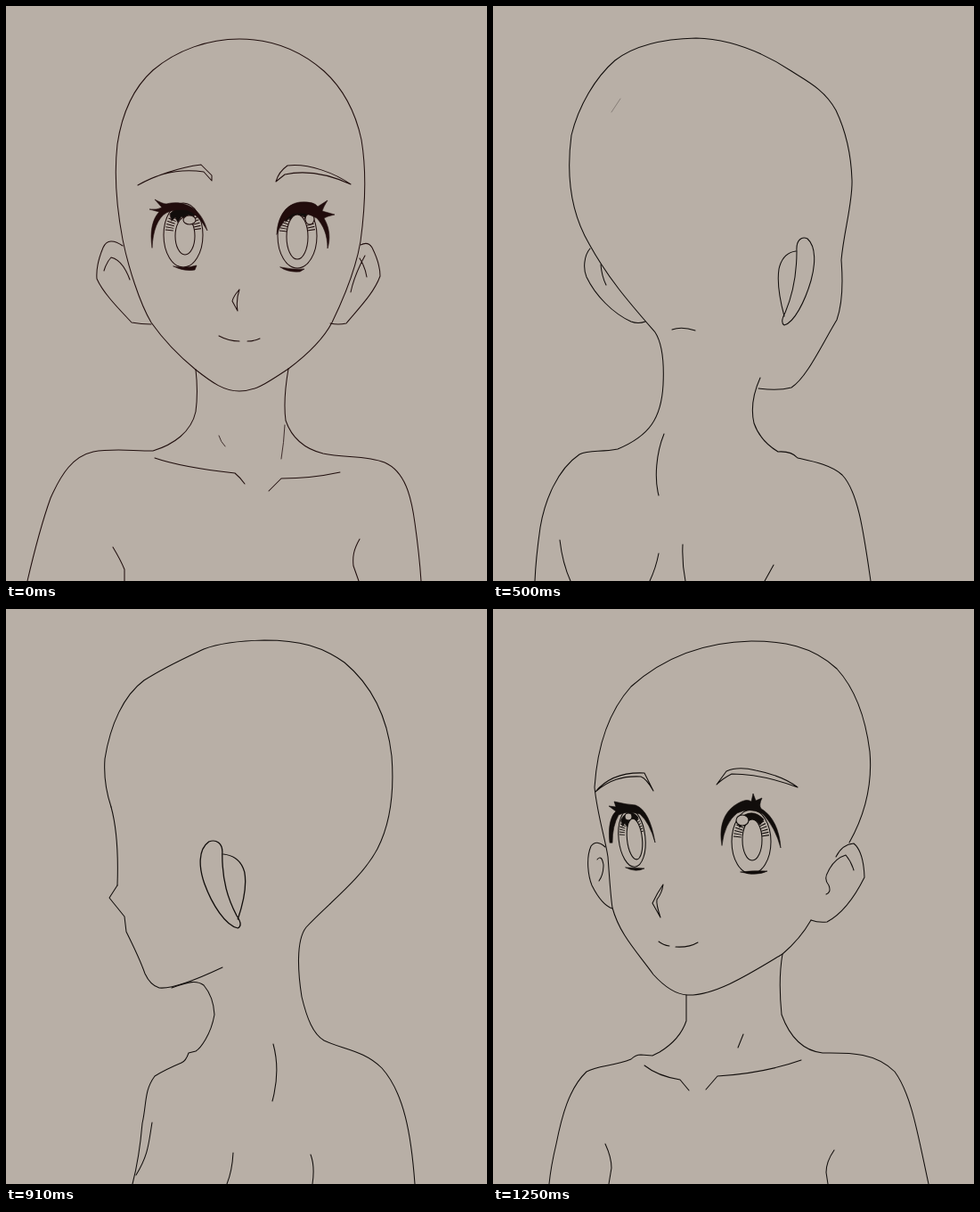
Animation of 540x645 px, one loop 1330 ms. Source, as an HTML page without scripts:

```html
<!DOCTYPE html>
<html lang="en">
<head>
<meta charset="utf-8">
<title>Head turnaround</title>
<style>
html,body{margin:0;height:100%;overflow:hidden;background:#b8afa6}
svg{display:block;width:100vw;height:100vh;overflow:hidden;fill:none;stroke:#110d0b;stroke-width:1.05;stroke-linecap:round;stroke-linejoin:round}
.warm{stroke:#210f0e}
.ink{fill:#110d0b;stroke-width:.6}
.warm .ink{fill:#210c0c}
.lit{fill:#b8afa6}
.faint{stroke-width:.6;opacity:.5}
.rim{vector-effect:non-scaling-stroke}
.hatch{stroke-width:9;stroke-dasharray:1 2;stroke-linecap:butt}
.strip{animation:turn 1330ms step-end infinite}
@keyframes turn{
0%{transform:translateX(0)}
6.01%{transform:translateX(-540px)}
12.03%{transform:translateX(-1080px)}
18.79%{transform:translateX(-1620px)}
24.81%{transform:translateX(-2160px)}
30.82%{transform:translateX(-2700px)}
37.59%{transform:translateX(-3240px)}
43.6%{transform:translateX(-3780px)}
49.62%{transform:translateX(-4320px)}
56.39%{transform:translateX(-4860px)}
62.4%{transform:translateX(-5400px)}
68.42%{transform:translateX(-5940px)}
75.18%{transform:translateX(-6480px)}
81.2%{transform:translateX(-7020px)}
87.21%{transform:translateX(-7560px)}
93.98%,100%{transform:translateX(-8100px)}
}
</style>
</head>
<body>
<svg viewBox="0 0 540 645" preserveAspectRatio="none">
<defs>
<g id="iris">
  <path class="hatch" d="M-15.7 -5A16 28 0 0 1 15.7 -5"/>
  <path class="ink" d="M-15 -24Q0 -40 14 -25L10 -19L6 -23L2 -16L-2 -21L-6 -14L-9 -20L-13 -16Z"/>
  <ellipse class="rim" rx="22" ry="36"/>
</g>

<!-- outline shared by the straight front and back views -->
<g id="outline">
  <path d="M213 408C191 390 175 372 163 355C150 333 137 292 131 262C124 225 121 190 125 155C131 115 145 90 165 72C192 49 228 37 262 37C300 37 332 51 357 73C380 94 393 122 399 150C404 180 404 220 398 264C394 288 382 322 366 355C354 378 333 395 317 407"/>
  <path d="M131 269C121 262 113 262 109 271C104 283 101 294 102 306C109 322 127 340 141 355Q152 357 163 357M398 268C404 265 408 266 411 271C416 281 420 292 420 303C413 322 397 338 382 356Q373 358 364 356"/>
  <path d="M213 408C215 425 215 440 213 455C208 478 188 492 165 499C140 499 120 496 98 500C75 505 62 525 50 552C40 580 31 615 24 645"/>
  <path d="M317 407C313 430 312 450 314 465C322 488 340 498 356 502C380 507 405 504 425 512C448 522 455 550 459 580Q464 615 466 645"/>
</g>

<g id="front" class="warm">
  <use href="#outline"/>
  <path d="M213 408C232 423 245 432 262 432C279 432 290 425 317 407"/>
  <path d="M110 297Q113 287 118 282Q131 285 139 307M387 321Q391 302 403 280M397 283Q403 292 405 304"/>
  <path d="M167 507C190 515 230 521 257 524Q263 529 268 536M295 544L309 530C330 530 352 528 375 523M120 607Q129 622 133 632V645M397 598C390 610 389 618 390 628L396 645"/>
  <path stroke-width=".8" d="M239 482Q241 489 246 494M313 470Q312 490 309 508"/>
  <path d="M148 201C168 190 195 181 219 178L231 190V196L222 186C195 182 170 188 148 201ZM303 197Q306 186 316 179C340 176 370 188 387 200C365 190 340 183 313 189Z"/>
  <path d="M262 318Q255 326 254 331L260 342Q258 330 262 318ZM239 370Q250 376 262 376M271 376Q279 376 285 373"/>
  <use href="#iris" transform="translate(199 257)"/>
  <ellipse class="lit" cx="201" cy="258" rx="11" ry="21"/>
  <ellipse class="lit" cx="206" cy="240" rx="7" ry="5"/>
  <use href="#iris" transform="translate(327 258)"/>
  <ellipse class="lit" cx="327" cy="259" rx="12" ry="25"/>
  <ellipse class="lit" cx="341" cy="239" rx="5" ry="6"/>
  <path class="ink" d="M164 271C161 252 165 238 172 231L161 228Q170 229 175 226L167 217Q176 222 180 222C200 217 219 226 226 252Q216 234 204 229Q190 227 180 232C170 238 165 252 164 271ZM188 292Q200 295 214 291L212 296Q200 298 188 292Z"/>
  <path class="ink" d="M304 256C305 235 315 222 330 220Q346 219 350 225L361 218Q356 226 355 230L369 234Q360 236 357 238C364 250 364 262 361 272C361 256 356 246 349 238Q335 230 322 233Q310 240 304 256ZM308 293Q322 296 335 295L330 298Q316 299 308 293Z"/>
</g>

<g id="back">
  <use href="#outline"/>
  <path d="M243 366Q262 359 282 366M118 284Q121 300 128 314M404 284Q402 302 394 318M262 492Q265 525 262 552M112 615Q114 632 121 645M232 616Q230 632 225 645M289 616L293 645M396 612Q394 632 388 645"/>
</g>

<g id="quarter">
  <path d="M109 268C90 236 84 200 86 165C89 120 110 82 137 61C165 42 200 36 230 36C280 38 325 62 363 86C383 103 393 127 399 158C405 190 405 210 399 232C394 255 390 280 391 292C393 315 391 335 386 352C372 376 360 402 343 423Q336 432 318 430C275 427 240 411 215 396Q185 376 170 350"/>
  <path d="M151 283C146 266 130 258 117 261C107 266 102 284 103 302C113 322 133 343 150 352Q161 357 173 354M112 298Q118 276 126 274C138 279 147 292 149 304Q144 309 147 314Q150 319 154 319"/>
  <path d="M182 364C190 385 192 410 190 432C188 460 178 480 148 494C130 500 110 498 90 508C68 520 60 538 54 560C42 595 35 622 32 645M295 428C289 448 291 466 302 483Q312 495 327 501Q333 499 338 504C355 510 372 510 385 521C401 540 408 567 413 600Q416 625 417 645"/>
  <path d="M179 506C205 518 240 522 272 525L284 539M297 538L306 523Q320 517 326 509M227 472L239 490M154 614L152 645M377 604Q374 617 375 628Q380 640 387 645"/>
  <path class="faint" d="M53 595L51 604"/>
  <path d="M213 196C240 184 270 180 298 181L309 198Q303 190 298 187C270 184 240 189 213 196ZM403 190Q392 187 381 190L371 205Q380 196 403 194"/>
  <path d="M350 297Q355 320 371 329L361 344L359 342L365 331Q353 315 350 297ZM318 373Q325 379 335 378M346 377L351 375M233 262L238 284"/>
  <use href="#iris" transform="translate(259 258) scale(.97 1)"/>
  <ellipse class="lit" cx="255" cy="258" rx="9" ry="23"/>
  <ellipse class="lit" cx="271" cy="240" rx="6" ry="6"/>
  <use href="#iris" transform="translate(374 258) rotate(8) scale(.6 .92)"/>
  <ellipse class="lit" cx="370" cy="257" rx="8" ry="22" transform="rotate(8 370 257)"/>
  <path class="ink" d="M229 277C226 258 234 241 242 233L237 230Q245 229 248 226L243 216Q250 220 254 219C266 211 281 217 288 237C281 229 274 226 266 226C253 229 243 238 239 247C231 258 230 266 229 277ZM250 293L279 292L276 297L253 296Z"/>
  <path class="ink" d="M358 258C358 240 364 226 376 220Q386 217 389 224L396 218Q393 226 391 229L397 235L389 233Q374 230 366 240Q361 248 358 258ZM359 290H374L369 294Z"/>
</g>

<g id="profile">
  <path d="M180 358C140 345 110 312 92 277C78 245 74 205 78 172C82 140 94 108 117 80C150 48 185 34 222 35L275 39C325 52 360 80 380 110C398 144 406 175 406 204C404 228 395 246 387 261Q381 273 388 287Q394 301 414 320L397 338Q398 352 400 362L391 371L393 378Q388 386 384 405C380 424 376 430 366 430C345 427 320 422 297 419C287 434 280 455 281 466C283 490 308 508 331 530Q333 538 335 548C352 575 375 610 382 645"/>
  <path d="M178 358C186 375 184 395 182 420C178 460 166 478 150 498C128 528 115 555 116 590Q119 620 118 645M270 512C290 520 315 520 331 531M285 615C276 621 276 635 279 645"/>
  <path d="M221 285C214 268 205 261 197 261C180 265 170 280 168 292C171 310 178 327 185 334Q198 350 211 355Q225 354 233 348Q237 360 239 368L254 378M184 291Q192 288 205 279M189 276Q207 271 223 299Q219 305 221 312L224 316"/>
  <path d="M305 197C330 184 355 180 379 181Q383 190 383 203L376 186C350 186 330 189 305 197M376 365L389 370"/>
  <path stroke-width="1.9" d="M392 373L393 380"/>
  <use href="#iris" transform="translate(361 259) rotate(4) scale(.5 .88)"/>
  <ellipse class="lit" cx="356" cy="257" rx="5.5" ry="22" transform="rotate(5 356 257)"/>
  <ellipse class="lit" cx="361" cy="236" rx="4" ry="6"/>
  <path class="ink" d="M333 275Q325 265 327 254C332 240 345 230 362 226Q372 228 375 245Q375 232 370 224L372 208Q365 214 358 215L354 208L352 216C335 222 321 240 320 256Q321 266 326 271L325 264Q328 270 333 275ZM345 284Q352 289 365 290L360 292Q350 291 345 284Z"/>
</g>

<g id="backEar">
  <path d="M341 275C340 262 347 258 353 261C363 270 362 290 357 308C350 332 338 355 327 358Q322 355 328 344C336 325 341 305 341 275M340 275Q325 277 321 295Q318 315 327 348"/>
</g>
<g id="quarterBack">
  <path d="M298 429Q320 432 335 428C352 417 368 382 386 352C392 335 393 310 391 285C394 252 404 220 403 195C402 165 395 138 385 117C372 93 350 83 335 73C300 50 265 37 228 36C185 37 155 47 137 61C115 80 96 112 88 145C82 190 88 233 108 267C130 307 155 335 182 366C191 380 192 405 191 425C189 462 176 482 140 497C120 501 108 497 97 503C72 520 58 555 53 585Q48 620 47 645"/>
  <path d="M300 417C291 437 290 455 293 468Q300 488 320 500Q335 499 342 507C360 511 380 515 392 526C410 545 416 590 424 645"/>
  <path d="M109 272C102 280 101 295 105 304C115 325 135 345 155 354Q163 357 171 354M121 290Q122 303 127 313"/>
  <use href="#backEar"/>
  <path d="M201 363Q212 359 227 364M192 480C183 502 181 530 186 549M75 599Q78 625 87 645M186 614Q183 630 176 645M213 604Q212 625 216 645M315 627L305 645"/>
  <path class="faint" d="M143 104L133 119"/>
</g>

<g id="slightBack">
  <path d="M222 432Q208 431 193 416C172 396 155 377 147 360M128 263Q123 230 119 205C121 165 132 120 157 89C190 53 240 37 285 36C340 37 378 52 400 85C425 120 431 160 428 190C424 222 412 250 406 264L361 350Q349 369 331 385C327 400 326 430 329 448C337 473 350 490 365 497C385 501 410 496 430 504C465 520 472 560 480 590L494 645"/>
  <path d="M221 422Q224 445 221 467Q208 490 190 500Q180 503 169 500Q160 502 155 507C140 512 125 512 115 517C95 530 85 560 79 585Q70 622 69 645"/>
  <path d="M130 295Q140 270 126 263C114 264 111 280 113 297C118 322 132 350 145 360Q150 360 151 351Q149 343 143 339C149 318 149 290 141 278L135 273M129 304Q131 318 136 329"/>
  <path d="M406 264Q414 264 417 278Q423 292 422 303C412 325 395 342 380 351Q370 352 361 350M403 288Q404 308 387 329M263 366Q282 357 302 365M292 492Q299 525 295 555M155 625Q157 637 161 645M273 619Q270 635 266 645M314 617L317 645M410 615Q408 632 402 645"/>
</g>

<!-- outline shared by the views next to the profile -->
<g id="nearOutline">
  <path d="M118 222Q109 195 111 168C117 130 132 97 155 80C180 64 205 53 222 45Q245 36 290 35C330 35 355 42 380 60C410 85 428 120 433 165C436 205 431 242 417 269C399 303 361 331 337 357C325 372 328 410 332 435C338 460 345 477 357 484C378 494 402 495 422 515C447 543 455 590 459 645"/>
  <path d="M125 310L116 324L133 345L135 362Q150 392 156 409Q162 422 172 425Q190 427 243 402"/>
  <path d="M186 425C205 418 214 416 222 422Q233 435 234 455C230 478 218 493 213 496L205 498Q202 507 197 509Q178 517 167 524C155 540 158 555 153 577C151 600 148 622 142 645M164 576C160 600 160 612 146 635"/>
</g>
<g id="nearProfile">
  <use href="#nearOutline"/>
  <path d="M118 200C133 222 146 250 144 270Q141 285 131 291Q125 302 125 310M133 335L134 346M137 369Q140 374 147 373M155 372L163 369"/>
  <path d="M204 512Q205 522 211 528L209 535M220 534L225 525C255 521 285 515 315 508M273 467Q266 482 253 496M342 622Q347 625 347 642"/>
  <path d="M313 280C320 268 335 257 348 258C360 266 368 285 368 299C360 320 345 335 328 350L308 349Q303 370 287 375M351 288Q343 282 335 275Q315 283 314 300Q322 309 317 314L312 315"/>
  <path d="M152 193L155 184C180 175 210 178 234 190C205 182 180 184 152 193ZM110 188Q116 193 117 199L112 196"/>
  <path class="faint" d="M394 244L393 252"/>
  <use href="#iris" transform="translate(193 252) rotate(-5) scale(.65 .96)"/>
  <ellipse class="lit" cx="196" cy="254" rx="7" ry="19"/>
  <ellipse class="lit" cx="186" cy="227" rx="5" ry="6"/>
  <use href="#iris" transform="translate(130 254) rotate(-10) scale(.4 .75)"/>
  <ellipse class="lit" cx="134" cy="257" rx="4.5" ry="17" transform="rotate(-8 134 257)"/>
  <path d="M230 262L222 274L218 264"/>
  <path class="ink" d="M176 237C176 217 186 207 197 209L201 201L205 211L211 205V214C224 226 232 245 232 258L231 270L228 254C223 235 212 221 199 216C187 217 180 225 176 237ZM184 284Q196 287 207 284L203 287Q192 289 184 284Z"/>
  <path class="ink" d="M111 225L121 226Q131 224 138 240Q140 250 140 260Q134 238 122 232ZM130 279Q136 281 142 279L139 282Z"/>
</g>
<g id="nearBack">
  <use href="#nearOutline"/>
  <path d="M118 222Q127 255 125 310M300 488C306 510 305 530 299 552M255 610Q254 630 248 645M342 612Q347 625 344 645"/>
  <use href="#backEar" transform="matrix(-1.25 0 0 1 669 0)"/>
</g>

<g id="slight">
  <path d="M400 262C418 230 426 195 423 160C418 120 407 90 386 67C358 41 325 36 290 36C240 37 193 53 155 87C130 115 117 155 114 200C117 230 126 258 129 278C131 305 132 322 134 335C142 365 162 385 180 410Q200 432 218 433C250 434 290 408 325 387Q345 370 357 349"/>
  <path d="M385 278Q392 264 405 263Q416 272 417 301C405 325 390 343 375 351Q365 352 357 349M374 320Q380 318 377 310Q371 303 376 295Q383 280 396 276Q402 283 405 293M126 267Q116 258 110 266C104 280 107 300 111 310Q122 332 134 336M117 281Q122 275 124 287Q124 298 119 305"/>
  <path d="M217 433V462Q210 483 187 497L179 501L166 500Q160 500 155 505C135 513 118 512 105 519C85 538 77 570 71 600Q65 625 63 645M325 387C321 410 322 435 324 455C335 485 352 496 370 498C397 498 428 496 451 519C470 545 477 590 489 645"/>
  <path d="M170 512Q185 524 210 528L220 540M239 539L252 524C285 522 315 517 346 506M281 477L275 492M126 600Q133 615 133 627L130 645M383 607Q374 620 374 632L376 645"/>
  <path d="M115 205C130 187 150 183 170 184L180 204Q172 190 166 188C145 187 130 192 115 205ZM251 197L262 182Q275 176 295 181Q325 187 342 200C315 190 290 185 268 185Q258 190 251 197Z"/>
  <path d="M191 309Q184 319 179 330L188 346Q183 331 184 326Q190 318 191 309ZM186 373Q191 377 198 378M205 379Q220 380 230 374"/>
  <use href="#iris" transform="translate(156 257) rotate(-6) scale(.68 .9)"/>
  <ellipse class="lit" cx="159" cy="258" rx="8.5" ry="23" transform="rotate(-6 159 258)"/>
  <ellipse class="lit" cx="152" cy="233" rx="4" ry="4"/>
  <use href="#iris" transform="translate(290 261)"/>
  <ellipse class="lit" cx="291" cy="259" rx="11" ry="23"/>
  <ellipse class="lit" cx="280" cy="237" rx="7" ry="6"/>
  <path class="ink" d="M131 262C129 245 132 232 138 227L130 221L138 222L136 216Q148 219 160 220Q176 226 182 262Q176 240 165 230Q150 226 141 231Q134 243 134 262ZM149 290L170 291Q160 296 149 290Z"/>
  <path class="ink" d="M257 265C253 243 260 226 275 218Q285 212 290 216L292 207L295 215L302 212Q298 220 301 224C315 232 322 250 323 268Q317 245 303 230Q288 222 274 229Q260 240 257 265ZM278 295Q292 293 308 294Q296 300 278 295Z"/>
</g>
</defs>

<!-- one pose per 540 px; the far half of the turn mirrors the near half -->
<g class="strip">
  <use href="#front"/>
  <use href="#slight" transform="matrix(-1 0 0 1 1056 0)"/>
  <use href="#quarter" x="1080"/>
  <use href="#nearProfile" transform="matrix(-1 0 0 1 2136 0)"/>
  <use href="#profile" x="2160"/>
  <use href="#nearBack" transform="matrix(-1 0 0 1 3216 0)"/>
  <use href="#quarterBack" x="3240"/>
  <use href="#slightBack" transform="matrix(-1 0 0 1 4296 0)"/>
  <use href="#back" x="4320"/>
  <use href="#slightBack" x="4860"/>
  <use href="#quarterBack" transform="matrix(-1 0 0 1 5916 0)"/>
  <use href="#nearBack" x="5940"/>
  <use href="#profile" transform="matrix(-1 0 0 1 6996 0)"/>
  <use href="#nearProfile" x="7020"/>
  <use href="#quarter" transform="matrix(-1 0 0 1 8076 0)"/>
  <use href="#slight" x="8100"/>
</g>
</svg>
</body>
</html>
```
